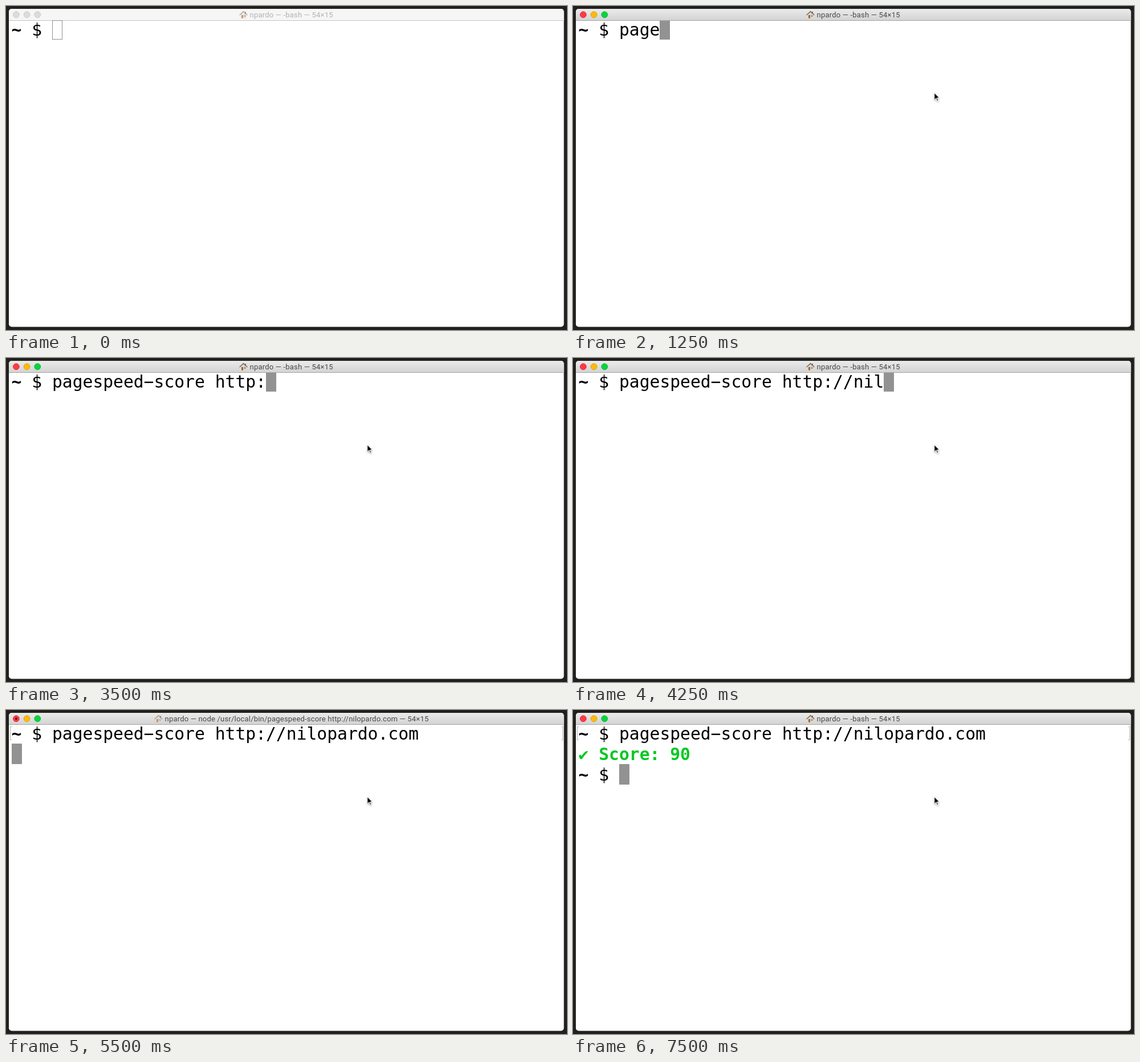
An HTML page with a canvas that plays this animation: 984 by 569 pixels, repeating every 8000 ms.

```html
<!DOCTYPE html>
<html lang="en">
<head>
<meta charset="utf-8">
<title>Terminal</title>
<style>
html, body { margin: 0; width: 100%; height: 100%; overflow: hidden; background: #21201c; }
canvas { display: block; }
</style>
</head>
<body>
<canvas id="stage" width="984" height="569"></canvas>
<script>
const ctx = document.getElementById('stage').getContext('2d');
const LOOP = 8000, CELL = 17.86, LEFT = 9.5, BASE = 52, ROW = 35.75;
const MONO = '29.66px "DejaVu Sans Mono", "DejaVu Sans", monospace';
const USER = 'npardo', COMMAND = 'pagespeed-score http://nilopardo.com';
const GREY = '#929292';

// [time, characters typed]
const TYPING = [
  [1000, 1], [1250, 4], [1500, 8], [1750, 12], [2000, 16],
  [2750, 17], [3000, 18], [3250, 20], [3500, 21], [3750, 23],
  [4000, 24], [4250, 26], [4500, 29], [4750, 32], [5000, 35], [5250, 36]
];
const ENTER = 5500, SPIN = 5750, DONE = 7000;
const SPINNER = '⠋⠙⠹⠸⠼⠴⠦⠧⠇⠏';

function rect(x, y, w, h, color) {
  ctx.fillStyle = color;
  ctx.fillRect(x, y, w, h);
}

function dot(x, y, r, color, edge) {
  ctx.beginPath();
  ctx.arc(x, y, r, 0, 7);
  ctx.fillStyle = color;
  ctx.fill();
  if (edge) {
    ctx.strokeStyle = edge;
    ctx.lineWidth = 1;
    ctx.stroke();
  }
}

function shape(points, color) {
  ctx.beginPath();
  points.forEach(p => ctx.lineTo(...p));
  ctx.closePath();
  ctx.fillStyle = color;
  ctx.fill();
}

// The minus sign gives the wide terminal hyphen.
function print(text, col, row, color = '#000', weight = '') {
  ctx.font = weight + ' ' + MONO;
  ctx.fillStyle = color;
  [...text.replace('-', '−')].forEach((c, i) =>
    ctx.fillText(c, LEFT + (col + i) * CELL, BASE + row * ROW));
}

function prompt(row) {
  print('~', 0, row, '#000', 'bold');
  print('$', 2, row);
}

function block(col, row) {
  const x = Math.round(LEFT + col * CELL), y = row ? Math.round(23.5 + row * ROW) : 26;
  rect(x, y, 18, row ? 36 : 33, GREY);
}

function house(x, alpha) {
  ctx.globalAlpha = alpha;
  rect(x + 2.5, 14, 10, 7.5, '#e5d6bd');
  rect(x + 10, 10, 2, 4, '#9a5b42');
  shape([[x, 15.5], [x + 7.5, 8.5], [x + 15, 15.5], [x + 13.8, 16.5], [x + 7.5, 11], [x + 1.2, 16.5]], '#80736b');
  rect(x + 4, 16, 3, 5.5, '#9c6238');
  rect(x + 8.5, 16, 3, 3, '#829aa8');
  ctx.globalAlpha = 1;
}

function frame(active, running) {
  rect(0, 0, 984, 569, '#21201c');
  ctx.beginPath();
  ctx.roundRect(5, 5, 973.5, 558.5, 5);
  ctx.fillStyle = '#fff';
  ctx.fill();

  const bar = ctx.createLinearGradient(0, 5, 0, 26);
  bar.addColorStop(0, active ? '#ebebeb' : '#f6f6f6');
  bar.addColorStop(1, active ? '#d2d2d2' : '#f6f6f6');
  ctx.beginPath();
  ctx.roundRect(5, 5, 973.5, 21, [5, 5, 0, 0]);
  ctx.fillStyle = bar;
  ctx.fill();
  rect(5, 25, 973.5, 1, active ? '#a5a5a5' : '#c4c4c4');

  const lights = [['#fc3b46', '#e0303b'], ['#fdb90c', '#dfa00d'], ['#06d43e', '#08b935']];
  lights.forEach(([fill, edge], i) =>
    dot(17.9 + i * 18.7, 15.2, 5.4, active ? fill : '#dcdcdc', active ? edge : '#cbcbcb'));
  if (running) dot(17.9, 15.2, 2, '#5c0508');

  const x = running ? 260 : 409;
  house(x, active && !running ? 1 : 0.55);
  ctx.font = '13px Roboto, sans-serif';
  ctx.letterSpacing = '0.2px';
  ctx.fillStyle = active ? '#484848' : '#b2b2b2';
  const job = running ? 'node /usr/local/bin/' + COMMAND : '-bash';
  ctx.fillText(`${USER} — ${job} — 54×15`, x + 18.5, 20);
  ctx.letterSpacing = '0px';
}

function brackets() {
  [[7, 7], [976, 974]].forEach(([x, tick]) => {
    rect(x, 29, 1, 24, '#b4b4b4');
    rect(tick, 29, 3, 1, '#b4b4b4');
    rect(tick, 52, 3, 1, '#b4b4b4');
  });
}

function spinner(step) {
  const bits = SPINNER.charCodeAt(step * 3 % 10) - 0x2800;
  for (let i = 0; i < 6; i++)
    if (bits >> i & 1) dot(i < 3 ? 15.8 : 23.4, 69.5 + i % 3 * 7, 1.7, '#808080');
}

function pointer() {
  ctx.save();
  ctx.translate(633.5, 151.5);
  ctx.shadowColor = 'rgba(0,0,0,.4)';
  ctx.shadowBlur = 3;
  ctx.shadowOffsetY = 1;
  const arrow = [[0, 0], [0, 14.5], [3.3, 11.5], [5.4, 16.3], [7.8, 15.2], [5.7, 10.6], [10, 10.4]];
  shape(arrow, '#fff');
  ctx.shadowColor = 'transparent';
  shape([[0.8, 2], [0.8, 12.4], [3.6, 9.8], [5.9, 14.9], [6.7, 14.5], [4.5, 9.6], [8, 9.4]], '#000');
  ctx.restore();
}

function draw(t) {
  const active = t >= 250, entered = t >= ENTER, done = t >= DONE;
  frame(active, entered && !done);
  if (entered) brackets();

  let typed = 0;
  for (const [at, count] of TYPING) if (t >= at) typed = count;
  prompt(0);
  print(COMMAND.slice(0, typed), 4, 0);

  if (done) {
    print('✔', 0, 1, '#06c822');
    print('Score: 90', 2, 1, '#06c822', 'bold');
    prompt(2);
    block(4, 2);
  } else if (t >= SPIN) {
    spinner(Math.floor((t - SPIN) / 250));
    print('Calculating...', 2, 1, '#cfcfcf');
  } else if (entered) {
    block(0, 1);
  } else if (active) {
    block(4 + typed, 0);
  } else {
    ctx.strokeStyle = GREY;
    ctx.lineWidth = 1;
    ctx.strokeRect(81.5, 25.5, 17, 33);
  }
  if (active) pointer();
}

function tick() {
  draw(performance.now() % LOOP);
  requestAnimationFrame(tick);
}
tick();
</script>
</body>
</html>
```
